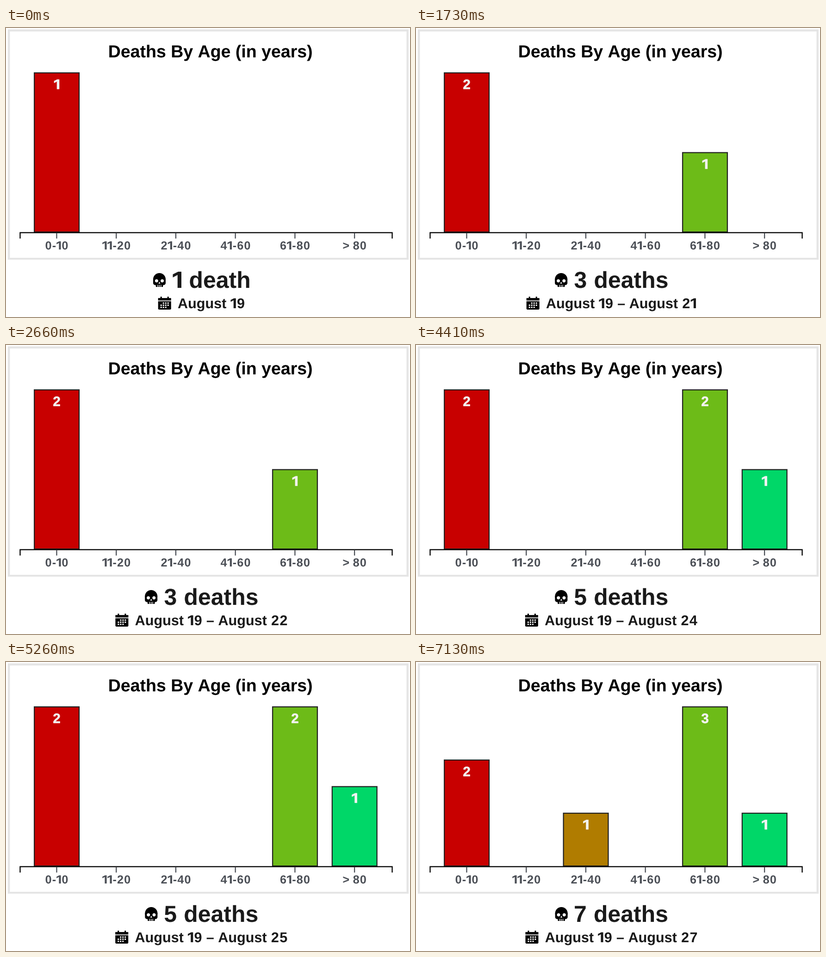
Write a matplotlib script that moves like this. It is 873x625 px and loops after 8000 ms.

```python
import matplotlib.pyplot as plt
from matplotlib.animation import FuncAnimation
from matplotlib.patches import Circle, PathPatch, Polygon, Rectangle
from matplotlib.path import Path
from matplotlib.textpath import TextPath
from matplotlib.transforms import Affine2D

W, H = 873, 625
DPI = 100
STEP, LOOP = 20, 8000
PX = 72 / DPI

plt.rcParams["path.snap"] = False

FONT = {"family": "Liberation Sans", "weight": "bold"}
INK, GREY, DARK = "#1a1a1a", "#4b4f56", "#222222"
AGES = ["0-10", "11-20", "21-40", "41-60", "61-80", "> 80"]
COLORS = {0: "#c80000", 2: "#b07c00", 4: "#6dbb18", 5: "#00d768"}

# One day per step: when it appears and the age group of that day's death
STARTS = [0, 930, 1730, 2660, 3540, 4410, 5260, 6200, 7130]
GROUPS = [0, 4, 0, None, 5, 4, None, 2, 4]
FIRST_DAY = 19

FIRST_X, GAP_X = 109.5, 128.72
BASE, FULL = 442, 345
AXIS_Y = BASE + .6
MIDDLE = 421.8

# Footless numeral one, in em units
ONE = [(.39, 0), (.39, .7), (.25, .7), (.02, .585), (.02, .45),
       (.225, .56), (.225, 0)]

fig = plt.figure(figsize=(W / DPI, H / DPI), dpi=DPI, facecolor="white")
ax = fig.add_axes([0, 0, 1, 1])
ax.set_xlim(0, W)
ax.set_ylim(H, 0)
ax.axis("off")


def text_path(s, size):
    return TextPath((0, 0), s, size=size, prop=FONT)


def glyph(ch, size):
    """Outline and advance of one character."""
    if ch == "1":
        pts = [(x * size, y * size) for x, y in ONE + ONE[:1]]
        return Path(pts, closed=True), .44 * size
    bar_end = text_path("|", size).get_extents().x1
    advance = text_path(ch + "|", size).get_extents().x1 - bar_end
    return (None if ch == " " else text_path(ch, size)), advance


def text_line(s, size):
    """Outline of a line of text with its ink starting at x = 0."""
    parts, pen = [], 0
    for ch in s:
        path, advance = glyph(ch, size)
        pad = .045 * size if ch == "-" or ch.isdigit() and ch != "1" else 0
        if path is not None:
            parts.append(path.transformed(
                Affine2D().translate(pen + pad / 2, 0)))
        pen += advance + pad
    line = Path.make_compound_path(*parts)
    return line.transformed(Affine2D().translate(-line.get_extents().x0, 0))


def place(line, x, y, color, extra=0):
    line = line.transformed(Affine2D().scale(1, -1).translate(x, y))
    return ax.add_patch(PathPatch(line, fc=color, ec=color, lw=extra * PX,
                                  zorder=5))


def centered(s, x, y, size, color, extra=0):
    line = text_line(s, size)
    return place(line, x - line.get_extents().x1 / 2, y, color, extra)


def fill(patch, color="black", z=3):
    patch.set(facecolor=color, linewidth=0, zorder=z)
    return ax.add_patch(patch)


def rect(x, y, w, h, color="black", z=3):
    return fill(Rectangle((x, y), w, h), color, z)


def polygon(x, y, pts, color="black", z=3):
    return fill(Polygon([(x + px, y + py) for px, py in pts]), color, z)


def stroke(xs, ys, color, z):
    ax.plot(xs, ys, color=color, lw=2.3 * PX, zorder=z,
            solid_capstyle="butt", solid_joinstyle="miter")


def skull(x, y):
    half = [(0, 13), (0, 22.5), (1.8, 25.4), (5.5, 26), (6, 30)]
    outline = half + [(27 - px, py) for px, py in reversed(half)]
    parts = [fill(Circle((x + 13.5, y + 13.5), 13.5)),
             polygon(x, y, outline),
             polygon(x, y, [(13.5, 18.6), (15.6, 22.8), (11.4, 22.8)],
                     "white", 4)]
    for side in (-1, 1):
        eye = Circle((x + 13.5 + 6.1 * side, y + 16.8), 3.5)
        parts.append(fill(eye, "white", 4))
    for i in range(3):
        parts.append(rect(x + 9.4 + 3.4 * i, y + 25.4, 1.4, 4.8, "white", 4))
    return parts


def calendar(x, y):
    parts = [rect(x + 5, y, 3, 4), rect(x + 20, y, 3, 4),
             rect(x, y + 3, 28, 5.3)]
    parts.append(polygon(x, y, [(0, 10), (28, 10), (28, 26.5), (26.5, 28),
                                (1.5, 28), (0, 26.5)]))
    # The month starts after the first cell and ends before the last
    for cell in range(1, 11):
        row, col = divmod(cell, 4)
        parts.append(rect(x + 5 + 5 * col, y + 12.5 + 4.6 * row, 3, 2.9,
                          "white", 4))
    return parts


def caption(icon, top, gap, s, y, size):
    """Icon and text, centred together."""
    line = text_line(s, size)
    x = MIDDLE - (gap + line.get_extents().x1) / 2
    return icon(x, top) + [place(line, x + gap, y, INK)]


def bar(i, count, most):
    x = FIRST_X + GAP_X * i
    height = FULL * count / most
    top = BASE - height
    box = Rectangle((x - 48.3, top), 96.8, height - .8, fc=COLORS[i],
                    ec=DARK, lw=2.3 * PX, zorder=2)
    return [ax.add_patch(box),
            centered(str(count), x, top + 35, 29.5, "#f3f3f3", extra=.7)]


def scene(n):
    """Everything that shows on day n."""
    seen = [g for g in GROUPS[:n + 1] if g is not None]
    counts = {g: seen.count(g) for g in set(seen)}
    parts = []
    for group, count in counts.items():
        parts += bar(group, count, max(counts.values()))
    total = f"{len(seen)} death" + ("s" if len(seen) > 1 else "")
    dates = f"August {FIRST_DAY}" + (f" – August {FIRST_DAY + n}" if n else "")
    parts += caption(skull, 530, 42.5, total, 562, 50)
    parts += caption(calendar, 581, 43, dates, 606, 30.6)
    return parts


def backdrop():
    rect(4, 3, 866, 498, "#e5e5e5", 0)
    rect(8.5, 7.5, 857, 489.5, "white", 1)
    centered("Deaths By Age (in years)", 442, 63.5, 37.5, "black")
    stroke([30.5, 30.5, 834.5, 834.5], [455.3, AXIS_Y, AXIS_Y, 455.3],
           "black", 3)
    for i, age in enumerate(AGES):
        x = FIRST_X + GAP_X * i
        stroke([x, x], [AXIS_Y + 1, 455.3], GREY, 4)
        centered(age, x, 479, 25.2, GREY)


backdrop()
scenes = [scene(n) for n in range(len(STARTS))]


def update(frame):
    now = (frame + .5) * STEP
    current = sum(start <= now for start in STARTS) - 1
    for i, parts in enumerate(scenes):
        for part in parts:
            part.set_visible(i == current)
    return []


anim = FuncAnimation(fig, update, frames=LOOP // STEP, interval=STEP,
                     init_func=lambda: update(0), repeat=True,
                     repeat_delay=0, blit=False)
plt.show()
```
